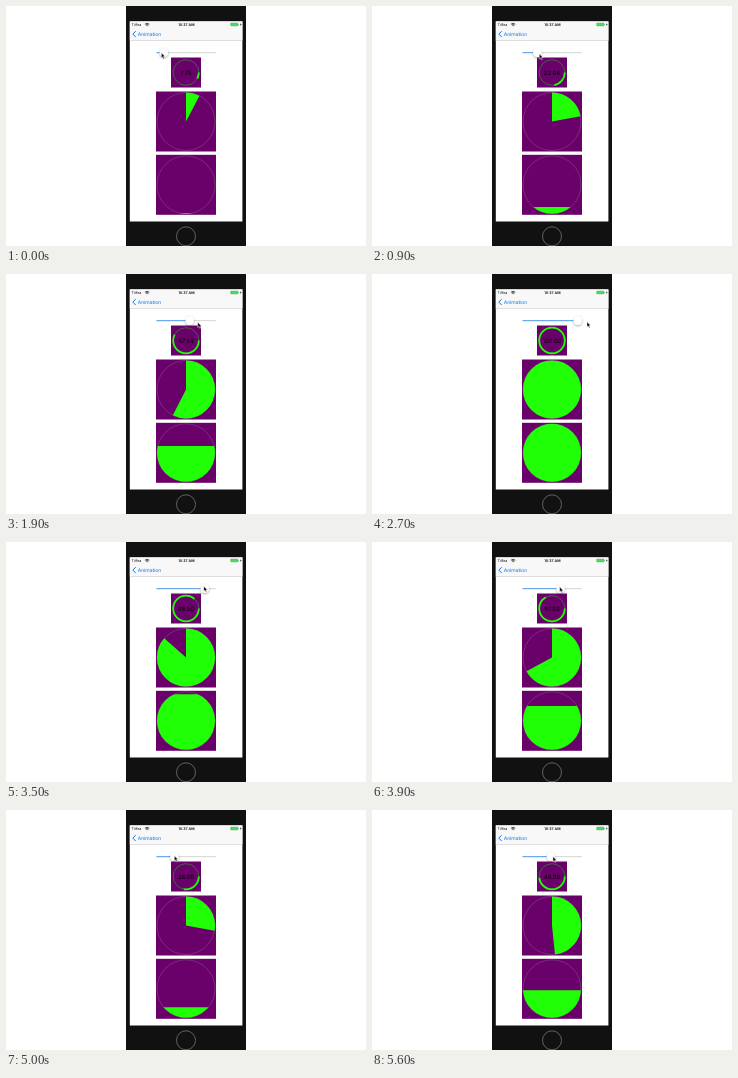
An HTML page that plays this animation: 360x240 px, repeating every 5700 ms.

```html
<!DOCTYPE html>
<html lang="en">
<head>
<meta charset="utf-8">
<title>Progress slider</title>
<style>
  html, body { margin: 0; width: 100%; height: 100%; overflow: hidden; background: #fff; }
  svg { display: block; width: 100vw; height: 100vh; }
  text { font-family: Inter, "Liberation Sans", sans-serif; text-rendering: geometricPrecision; }
  .box { fill: #6a006a; }
  .guide { fill: none; stroke: #87598c; stroke-width: .5; }
  .fill { fill: #21ff06; }
  .arc { fill: none; stroke: #21ff06; }
  .blue { fill: #007aff; }
</style>
</head>
<body>
<svg viewBox="0 0 360 240">
  <defs>
    <clipPath id="level"><rect id="water" x="150" width="60" height="60"/></clipPath>
    <filter id="shadow" x="-50%" y="-50%" width="200%" height="200%">
      <feDropShadow dx="0" dy=".8" stdDeviation=".8" flood-opacity=".4"/>
    </filter>
  </defs>

  <!-- Phone -->
  <rect x="120" width="120" height="240" fill="#111"/>
  <rect x="123.8" y="15.4" width="112.6" height="200.1" fill="#fff"/>
  <rect x="123.8" y="15.4" width="112.6" height="19.2" fill="#f8f8f8"/>
  <rect x="123.8" y="34.4" width="112.6" height=".4" fill="#b2b2b2"/>
  <circle cx="180" cy="230.3" r="9.5" fill="#111" stroke="#777" stroke-width=".8"/>

  <!-- Status bar -->
  <text x="125.6" y="19.9" font-size="3.6">Tilfira</text>
  <g fill="none" stroke="#000" stroke-width=".7">
    <path d="M138.9 18.2q2.2-1.8 4.4 0M139.8 19.1q1.3-1 2.6 0"/>
    <circle cx="141.1" cy="19.8" r=".2"/>
  </g>
  <text x="180.4" y="19.8" font-size="3.6" font-weight="600" text-anchor="middle">10:37 AM</text>
  <rect x="224.6" y="16.9" width="7.4" height="3.2" rx=".6" fill="#4cd964" stroke="#3ba850" stroke-width=".3"/>
  <path d="M232.5 18v1.2" stroke="#3ba850" stroke-width=".5"/>
  <path d="M235 17l-1 1.8h.8l-.4 1.5 1.2-2h-.8z"/>

  <!-- Navigation -->
  <path d="M129.7 25.2l-2.9 2.9 2.9 2.9" fill="none" stroke="#007aff" stroke-width="1"/>
  <text class="blue" x="131.7" y="29.9" font-size="5">Animation</text>

  <!-- Slider -->
  <rect x="150.5" y="46.5" width="59.2" height=".6" fill="#b7b7b7"/>
  <rect id="track" class="blue" x="150.5" y="46.5" height=".6"/>
  <circle id="thumb" cy="46.8" r="4.2" fill="#fff" filter="url(#shadow)"/>

  <!-- Ring -->
  <rect class="box" x="165" y="51.5" width="30" height="30"/>
  <circle cx="180" cy="66.5" r="12.8" fill="none" stroke="#3d7a3d" stroke-width=".8"/>
  <circle id="ring" class="arc" cx="180" cy="66.5" r="12.8" stroke-width="1.8" pathLength="100"/>
  <text id="label" x="180" y="68.5" font-size="5.9" text-anchor="middle"></text>

  <!-- Pie -->
  <rect class="box" x="150" y="85.5" width="60" height="60"/>
  <circle class="guide" cx="180" cy="115.5" r="29"/>
  <circle id="pie" class="arc" cx="180" cy="115.5" r="14.5" stroke-width="29"
          pathLength="100" transform="rotate(-90 180 115.5)"/>

  <!-- Liquid -->
  <rect class="box" x="150" y="148.8" width="60" height="60"/>
  <circle class="guide" cx="180" cy="178.8" r="29"/>
  <circle class="fill" cx="180" cy="178.8" r="29" clip-path="url(#level)"/>

  <path id="cursor" d="M0 0v5.2l1.2-1.1.9 2 .9-.4-.9-1.9h1.6z" stroke="#fff" stroke-width=".5"/>
</svg>
<script>
  const LOOP = 5700, STEP = 100;
  const [track, thumb, ring, label, pie, water, cursor] =
    ["track", "thumb", "ring", "label", "pie", "water", "cursor"]
      .map(id => document.getElementById(id));

  // Key poses of the drag: x and y place the pointer relative to the thumb.
  const keys = [
    { t: 0, percent: 7.75, x: -2.5, y: 0 },
    { t: 900, percent: 22.04, x: 2, y: 1 },
    { t: 1900, percent: 57.54, x: 8, y: 1.5 },
    { t: 2500, percent: 100, x: 9.2, y: 1 },
    { t: 3100, percent: 100, x: 9.2, y: 1 },
    { t: 3500, percent: 86.5, x: -1, y: -2.6 },
    { t: 4300, percent: 48.26, x: -1, y: -1.2 },
    { t: 5000, percent: 28, x: 0, y: -1 },
    { t: 5600, percent: 48.3, x: 2, y: -.4 }
  ];

  const slope = (a, b, name) => (b[name] - a[name]) / (b.t - a.t);

  // Harmonic mean of neighbouring slopes; flat at turning points.
  function tangent(i, name) {
    const a = keys[i - 1], k = keys[i], b = keys[i + 1];
    if (!a) return slope(k, b, name);
    if (!b) return slope(a, k, name);
    const m = slope(a, k, name), n = slope(k, b, name);
    return m * n > 0 ? 2 * m * n / (m + n) : 0;
  }

  // Smooth curve through the keys that never overshoots them.
  function sample(name, t) {
    const i = Math.max(1, keys.findIndex(k => k.t >= t));
    const a = keys[i - 1], b = keys[i], d = b.t - a.t, u = (t - a.t) / d;
    const ease = u * u * (3 - 2 * u);
    return a[name] + (b[name] - a[name]) * ease
      + d * u * (1 - u) * ((1 - u) * tangent(i - 1, name) - u * tangent(i, name));
  }

  function draw(t) {
    const p = sample("percent", t);
    const x = 153.8 + 0.52 * p;
    track.setAttribute("width", x - 150.5);
    thumb.setAttribute("cx", x);
    ring.setAttribute("stroke-dasharray", `${p} 100`);
    pie.setAttribute("stroke-dasharray", `${p} 100`);
    label.textContent = p.toFixed(2);
    // The liquid's arc, not its height, is proportional to the percentage.
    water.setAttribute("y", 178.8 + 29 * Math.cos(Math.PI * p / 100));
    cursor.setAttribute("transform",
      `translate(${x + sample("x", t)} ${46.8 + sample("y", t)})`);
  }

  const start = performance.now();
  function tick() {
    const t = (performance.now() - start) % LOOP;
    draw(Math.floor(t / STEP) * STEP);
    requestAnimationFrame(tick);
  }
  tick();
</script>
</body>
</html>
```
